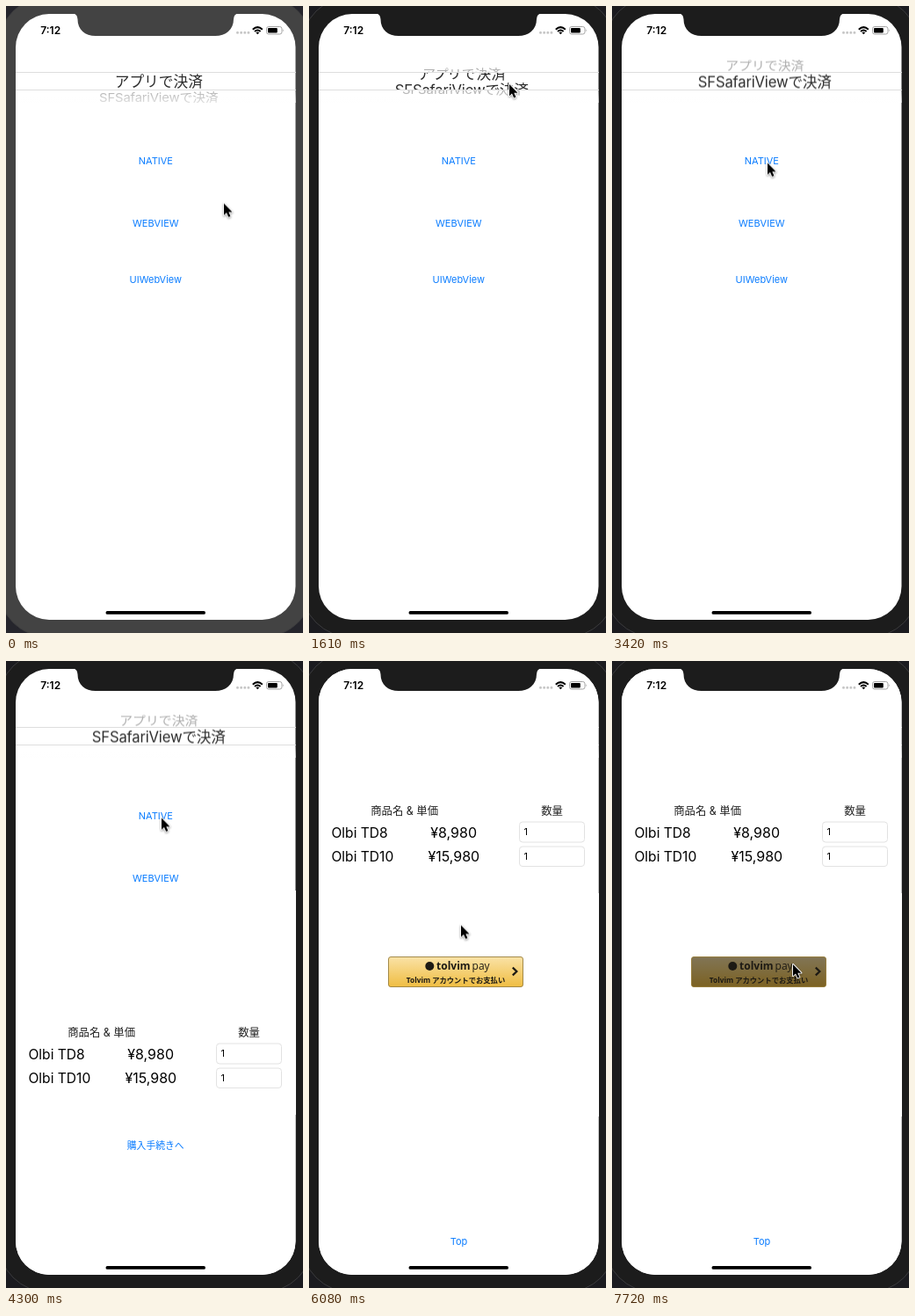
Write an HTML page that moves like this. It is 338 by 713 pixels and loops after 7990 ms.

```html
<!DOCTYPE html>
<html lang="ja">
<head>
<meta charset="utf-8">
<title>Checkout demo</title>
<style>
  html, body { margin: 0; width: 100%; height: 100%; overflow: hidden; background: #1c1c1f; }
  svg { display: block; width: 338px; height: 713px; }
  text { font-family: Inter, "Noto Sans CJK JP", sans-serif; }
  .mid { text-anchor: middle; }
  .link { font-size: 11px; fill: #0a7cff; text-anchor: middle; }
  .row { font-size: 16.7px; text-anchor: middle; }
  .latin { letter-spacing: -.2px; }
  .head { font-size: 12.4px; fill: #222; text-anchor: middle; }
  .item { font-size: 15.6px; }
  .price { font-size: 16px; text-anchor: middle; }
  .field { fill: #fff; stroke: #e2e2e2; }
  .qty { font-size: 11px; }
  .brand { font-family: "Open Sans", "Noto Sans CJK JP", sans-serif; fill: #1d1a14; }
  #cursor { filter: drop-shadow(0 1px 1px rgba(0, 0, 0, .4)); }
</style>
</head>
<body>
<svg viewBox="0 0 338 713">
  <defs>
    <clipPath id="screen"><rect x="11" y="9" width="318.5" height="689" rx="38"/></clipPath>
    <clipPath id="band"><rect x="11" y="76" width="319" height="19"/></clipPath>
    <clipPath id="rim"><path d="M11 61H330V75H11ZM11 96H330V110H11Z"/></clipPath>
    <linearGradient id="fade" x2="0" y2="1">
      <stop offset="0" stop-color="#fff" stop-opacity="0"/>
      <stop offset="1" stop-color="#fff" stop-opacity=".6"/>
    </linearGradient>
    <linearGradient id="gold" x2="0" y2="1">
      <stop offset="0" stop-color="#fae2a6"/>
      <stop offset="1" stop-color="#efbd42"/>
    </linearGradient>
  </defs>

  <rect id="desk" width="338" height="713" fill="#25252c"/>
  <rect id="bezel" x="-9" y="-11" width="358.5" height="729" rx="58" fill="#434343" stroke="#3b3b3d"/>

  <g clip-path="url(#screen)">
    <rect x="11" y="9" width="319" height="689" fill="#fff"/>

    <g clip-path="url(#rim)">
      <g class="wheel" fill="#aeaeae">
        <text class="row" transform="translate(173.8 90.7) scale(.89 .8)">アプリで決済</text>
        <text class="row latin" transform="translate(173.8 109.2) scale(.89 .8)">SFSafariViewで決済</text>
      </g>
      <rect x="11" y="96" width="319" height="14" fill="url(#fade)"/>
    </g>
    <g clip-path="url(#band)">
      <g class="wheel" fill="#2c2c2c">
        <text class="row" x="173.8" y="92">アプリで決済</text>
        <text class="row latin" x="173.8" y="110.5">SFSafariViewで決済</text>
      </g>
    </g>
    <path d="M11 75.5H330M11 95.5H330" stroke="#dedede"/>
    <text id="native" class="link" x="170.3" y="179.6">NATIVE</text>
    <text class="link" x="170.3" y="251.3">WEBVIEW</text>
    <text class="link" x="170.3" y="315.3">UIWebView</text>

    <g id="shop">
      <rect x="11" y="9" width="319" height="700" fill="#fff"/>
      <text class="head" x="108.6" y="174.6">商品名 &amp; 単価</text>
      <text class="head" x="276.6" y="174.6">数量</text>
      <text class="item" x="25.4" y="200.6">Olbi TD8</text>
      <text class="item" x="25.4" y="228.2">Olbi TD10</text>
      <text class="price" x="164.6" y="200.6">¥8,980</text>
      <text class="price" x="164.8" y="228.2">¥15,980</text>
      <rect class="field" x="239.5" y="183" width="74" height="23" rx="3.5"/>
      <rect class="field" x="239.5" y="211" width="74" height="22.5" rx="3.5"/>
      <text class="qty" x="244.5" y="198.4">1</text>
      <text class="qty" x="244.5" y="226.4">1</text>
      <text id="order" class="link" x="170.2" y="303.2" style="font-size:10.8px">購入手続きへ</text>
      <text class="link" x="170.5" y="664.3">Top</text>

      <g id="pay">
        <rect x="90.5" y="336.5" width="153" height="34" rx="2.5" fill="url(#gold)"/>
        <rect id="shade" x="90.5" y="336.5" width="153" height="34" rx="2.5" opacity="0"/>
        <rect x="90.5" y="336.5" width="153" height="34" rx="2.5" fill="none" stroke="#8f742c" stroke-opacity=".8"/>
        <circle cx="137.3" cy="347" r="5" fill="#1d1a14"/>
        <text class="brand" x="145" y="351" font-size="12"><tspan font-weight="700">tolvim</tspan><tspan dx="2">pay</tspan></text>
        <text class="brand mid" x="167" y="366" font-size="8.3" font-weight="700">Tolvim アカウントでお支払い</text>
        <path d="M231.8 348.6L236.4 353L231.8 357.4" fill="none" stroke="#1d1a14" stroke-width="2.2"/>
      </g>
    </g>
  </g>

  <path id="notch" d="M75 8Q81.500 9 81.500 15C81.500 27 90 34 102 34H238C250 34 259 27 259 15Q259 9 265.500 8Z" fill="#434343"/>
  <text class="mid" x="50.7" y="31.8" font-size="12" font-weight="600">7:12</text>
  <path d="M263.500 30.300h13" stroke="#c6c6c6" stroke-width="3" stroke-linecap="round" stroke-dasharray="0 4.150"/>
  <g fill="none" stroke="#000" stroke-width="2">
    <path d="M280.800 26.700Q286.300 21.600 291.800 26.700"/>
    <path d="M283 29Q286.300 26 289.600 29"/>
  </g>
  <path d="M284.400 30.300Q286.300 28.700 288.200 30.300L286.300 32.300Z"/>
  <rect x="296.500" y="23.500" width="17.500" height="8.500" rx="2.400" fill="none" stroke="#a3a3a3"/>
  <rect x="298" y="25" width="10.800" height="5.500" rx="1"/>
  <path d="M315.300 26.200q1.700 1.500 0 3Z" fill="#a3a3a3"/>
  <rect x="113.500" y="688" width="113.500" height="3.800" rx="1.900"/>

  <g id="cursor">
    <path d="M0 0V13.200L3 10.500L5.200 15.500L7.500 14.500L5.300 9.700H9.500Z" stroke="#fff" stroke-width="1.800" stroke-linejoin="round" paint-order="stroke"/>
  </g>
</svg>

<script>
  const LOOP = 7990;
  const $ = id => document.getElementById(id);
  const move = (x, y) => ({ transform: `translate(${x}px, ${y}px)` });
  const fill = color => ({ fill: color });
  const alpha = opacity => ({ opacity });

  // Each step [time, style] holds until the next one.
  function hold(el, steps) {
    const keys = steps.map(([t, style]) => ({ offset: t / LOOP, easing: 'steps(1, end)', ...style }));
    keys.push({ offset: 1, ...steps[steps.length - 1][1] });
    el.animate(keys, { duration: LOOP, iterations: Infinity });
  }

  const path = [
    [0, 248, 224.5],
    [150, 241, 178], [300, 233, 133],
    [600, 232, 123], [750, 230.5, 109], [900, 229.7, 101.5],
    [1350, 229, 97], [1490, 228, 89], [1640, 226.5, 80], [1780, 225, 72.5],
    [2650, 223, 82], [2800, 214, 112], [2960, 201, 145],
    [3110, 188, 168], [3270, 179, 177], [3420, 177, 178.5],
    [5030, 176.5, 202], [5180, 175, 250], [5330, 173.5, 290], [5480, 173, 300.5],
    [6670, 175, 303], [6820, 183, 312], [6970, 193, 326],
    [7120, 201, 338], [7270, 205, 344], [7420, 206, 345]
  ];
  hold($('cursor'), path.map(([t, x, y]) => [t, move(x, y)]));

  const scroll = [
    [0, 0], [1350, 3], [1490, 9], [1640, 16], [1780, 22],
    [1920, 22.5], [2060, 20.5], [2210, 19.2], [2350, 18.5]
  ];
  document.querySelectorAll('.wheel').forEach(el =>
    hold(el, scroll.map(([t, y]) => [t, move(0, -y)])));

  const rise = [[0, 1], [4150, .86], [4300, .36], [4450, .1], [4600, .02], [4740, 0]];
  hold($('shop'), rise.map(([t, part]) => [t, move(0, 700 * part)]));

  hold($('desk'), [[0, fill('#25252c')], [1200, fill('#1b1b1f')]]);
  for (const id of ['bezel', 'notch'])
    hold($(id), [[0, fill('#434343')], [1200, fill('#1c1c1c')]]);

  hold($('native'), [[0, alpha(1)], [4010, alpha(.25)], [4300, alpha(1)]]);
  hold($('order'), [[0, alpha(1)], [5780, alpha(.25)], [6080, alpha(0)]]);
  hold($('pay'), [[0, alpha(0)], [6080, alpha(1)]]);
  hold($('shade'), [[0, alpha(0)], [7720, alpha(.48)]]);
</script>
</body>
</html>
```
